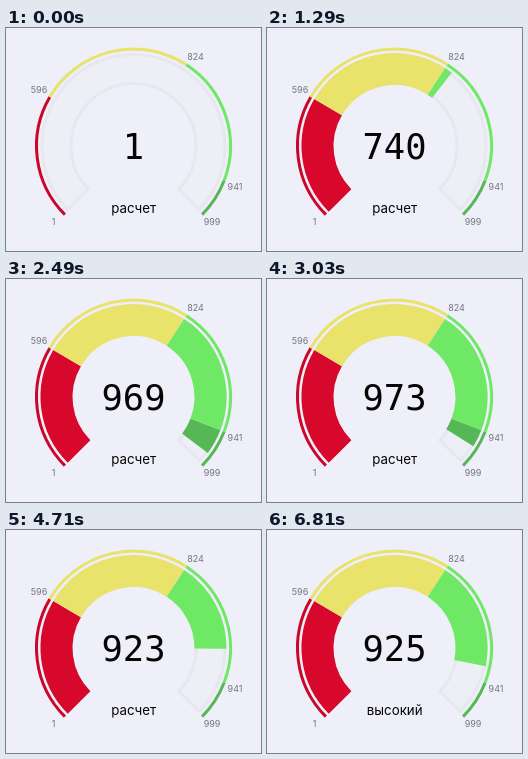
These frames come from a looping animation (255 by 223 pixels, 6.84 s). An HTML page:

```html
<!DOCTYPE html>
<html lang="ru">
<head>
<meta charset="utf-8">
<style>
  html, body { margin: 0; width: 100%; height: 100%; overflow: hidden; background: #eeeff9; }
  svg { display: block; width: 100vw; height: 100vh; }
  text { text-anchor: middle; font-family: Inter, Roboto, sans-serif; }
  .tick { font-size: 9px; fill: #74757e; }
  .status { font-size: 13.3px; fill: #050505; }
  #score { font: 35.5px "DejaVu Sans Mono", monospace; fill: #050505; }
</style>
</head>
<body>
<svg viewBox="0 0 255 223">
  <path id="track" fill="#edeef6" stroke="#e6e7ef" stroke-width="3"/>
  <g id="ring" fill="none" stroke-width="3"></g>
  <g id="band" fill="none" stroke-width="32"></g>
  <text class="tick" x="47.5" y="197">1</text>
  <text class="tick" x="33" y="65">596</text>
  <text class="tick" x="189.5" y="32">824</text>
  <text class="tick" x="229" y="162">941</text>
  <text class="tick" x="206" y="197">999</text>
  <text id="score" x="127.5" y="131">1</text>
  <text id="pending" class="status" x="127.7" y="185">расчет</text>
  <text id="result" class="status" x="127.7" y="185">высокий</text>
</svg>
<script>
const LOOP = 6840, CX = 127.5, CY = 118, SWEEP = 270;
const sectors = [
  { from: 0, to: 75.4, fill: '#d7082c', line: '#cb0629' },
  { from: 75.4, to: 168, fill: '#e9e26b', line: '#e9e26b' },
  { from: 168, to: 246, fill: '#6fe866', line: '#6fe866' },
  { from: 246, to: SWEEP, fill: '#56b755', line: '#56b755' }
];

// Keys are [milliseconds, value].
const sweepKeys = [[40, 0], [360, 56], [720, 122], [1440, 186], [1980, 240.6], [2480, 262],
  [3030, 257], [3540, 229], [3690, 216.8], [4120, 203.8], [4710, 225.5], [5250, 237.3], [5640, 236.3]];
const scoreKeys = [[40, 1], [720, 471], [1440, 792], [1980, 925], [2750, 976],
  [3030, 973], [3690, 946], [4710, 923], [5400, 925]];

const $ = id => document.getElementById(id);
const clamp = x => Math.min(1, Math.max(0, x));

function point(r, deg) {
  const a = (deg + 135) * Math.PI / 180;
  return `${(CX + r * Math.cos(a)).toFixed(2)} ${(CY + r * Math.sin(a)).toFixed(2)}`;
}

function arc(r, from, to, start = 'M') {
  const large = Math.abs(to - from) > 180 ? 1 : 0;
  return `${start}${point(r, from)}A${r} ${r} 0 ${large} ${to > from ? 1 : 0} ${point(r, to)}`;
}

// Monotone cubic interpolation: smooth, with extremes only at the keys.
function curve(keys) {
  const slope = i => (keys[i + 1][1] - keys[i][1]) / (keys[i + 1][0] - keys[i][0]);
  const last = keys.length - 1;
  const tangents = keys.map((_, i) => {
    if (i === 0) return slope(0);
    if (i === last) return 0;
    const a = slope(i - 1), b = slope(i);
    return a * b <= 0 ? 0 : 2 * a * b / (a + b);
  });
  return t => {
    if (t <= keys[0][0]) return keys[0][1];
    if (t >= keys[last][0]) return keys[last][1];
    const i = keys.findIndex(k => k[0] > t) - 1;
    const [t0, v0] = keys[i], [t1, v1] = keys[i + 1];
    const h = t1 - t0, u = (t - t0) / h, w = 1 - u;
    return v0 * (1 + 2 * u) * w * w + tangents[i] * h * u * w * w
      + v1 * u * u * (3 - 2 * u) - tangents[i + 1] * h * u * u * w;
  };
}

const sweepAt = curve(sweepKeys), scoreAt = curve(scoreKeys);

function addPath(parent, stroke) {
  const path = document.createElementNS('http://www.w3.org/2000/svg', 'path');
  path.setAttribute('stroke', stroke);
  return parent.appendChild(path);
}

$('track').setAttribute('d', arc(91.5, 1, SWEEP - 1) + arc(62.5, SWEEP - 1.4, 1.4, 'L') + 'Z');
for (const s of sectors) {
  addPath($('ring'), s.line).setAttribute('d', arc(97, s.from, s.to));
  s.path = addPath($('band'), s.fill);
}

function render(t) {
  const sweep = t < 60 ? 0 : sweepAt(t);
  for (const s of sectors) {
    const end = Math.min(s.to, sweep);
    s.path.setAttribute('d', end > s.from ? arc(77, s.from, end) : '');
  }
  $('score').textContent = t < 60 ? 1 : Math.round(scoreAt(t));
  $('pending').setAttribute('opacity', 1 - clamp((t - 5420) / 220));
  $('result').setAttribute('opacity', clamp((t - 5640) / 240));
}

const start = performance.now();
function tick() {
  render((performance.now() - start) % LOOP);
  requestAnimationFrame(tick);
}
tick();
</script>
</body>
</html>
```
